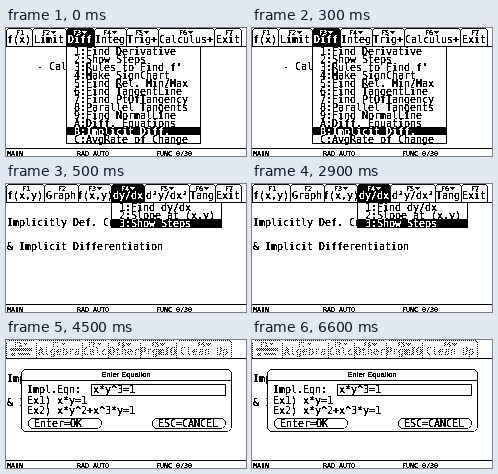
Recreate the animation shown at these times as an HTML page with a canvas. Size 240 by 128 pixels, loop 8 s.

```html
<!DOCTYPE html>
<html lang="en">
<head>
<meta charset="utf-8">
<title>Calculator menus</title>
<style>
  html, body { margin: 0; width: 100%; height: 100%; overflow: hidden; background: #fff; }
  canvas { display: block; width: 100vw; height: 100vh; image-rendering: pixelated; }
</style>
</head>
<body>
<canvas id="screen" width="240" height="128"></canvas>
<script>
const ctx = document.getElementById('screen').getContext('2d', { willReadFrequently: true });
const LOOP = 8000;
const BLACK = '#000', WHITE = '#fff';
const MONO = '"DejaVu Sans Mono", monospace';

function rect(x, y, w, h, color = BLACK) {
  ctx.fillStyle = color;
  ctx.fillRect(x, y, w, h);
}

function box(x, y, w, h, radius = 0) {
  ctx.fillStyle = WHITE;
  ctx.strokeStyle = BLACK;
  ctx.beginPath();
  ctx.roundRect(x + 0.5, y + 0.5, w - 1, h - 1, radius);
  ctx.fill();
  ctx.stroke();
}

// Painting twice keeps thin strokes dark enough to survive the threshold.
function glyphs(str, x, y) {
  ctx.fillText(str, x, y);
  ctx.fillText(str, x, y);
}

// One character per cell of the pixel grid; y is the baseline.
function gridText(str, x, y, color, font, cell) {
  ctx.font = font;
  ctx.fillStyle = color;
  [...str].forEach((ch, i) => glyphs(ch, x + cell * i, y));
}

const text = (str, x, y, color = BLACK) => gridText(str, x, y, color, '10px ' + MONO, 6);
const small = (str, x, y, color = BLACK) => gridText(str, x, y, color, '6.8px ' + MONO, 4);

// Tabs are [left edge, label, has arrow].
function toolbar(tabs, right, active = -1) {
  tabs.forEach(([x, label, arrow], i) => {
    const end = i + 1 < tabs.length ? tabs[i + 1][0] : right;
    const mid = Math.round((x + end) / 2);
    const ink = i === active ? WHITE : BLACK;
    rect(x + 2, 0, end - x - 3, 1);
    rect(x + 1, 1, 1, 1);
    rect(end - 1, 1, 1, 1);
    rect(x, 2, 1, 16);
    rect(end, 2, 1, 16);
    if (i === active) rect(x + 1, 1, end - x - 1, 17);
    small('F' + (i + 1), mid - (arrow ? 7 : 3), 7, ink);
    if (arrow) [5, 3, 1].forEach((w, row) => rect(mid + 2 + row, 3 + row, w, 1, ink));
    text(label, mid - label.length * 3, 15, ink);
  });
  rect(0, 18, 240, 1);
}

function menu(x, w, items, selected) {
  box(x, 18, w, items.length * 8 + 2);
  items.forEach((item, i) => {
    const on = i === selected;
    const key = (i + 1).toString(16).toUpperCase();
    if (on) rect(x, 19 + 8 * i, w, 8);
    text(key + ':' + item, x + 8, 27 + 8 * i, on ? WHITE : BLACK);
  });
}

function statusBar() {
  rect(0, 120, 240, 1);
  small('MAIN', 1, 128);
  small('RAD AUTO', 71, 128);
  small('FUNC 0/30', 150, 128);
}

function differentiationMenu() {
  text('- Cal', 31, 42);
  toolbar([[0, 'f(x)'], [26, 'Limit', 1], [60, 'Diff', 1], [88, 'Integ', 1],
    [120, 'Trig+', 1], [152, 'Calculus+', 1], [208, 'Exit']], 235, 2);
  menu(60, 135, ['Find Derivative', 'Show Steps', "Rules to Find f'", 'Make SignChart',
    'Find Rel. Min/Max', 'Find TangentLine', 'Find PtOfTangency', 'Parallel Tangents',
    'Find NormalLine', 'Diff. Equations', 'Implicit Diff.', 'AvgRate of Change'], 10);
}

function implicitText() {
  text('Implicitly Def. Cu', 1, 42);
  text('& Implicit Differentiation', 1, 66);
}

function implicitMenu() {
  implicitText();
  toolbar([[0, 'f(x,y)'], [38, 'Graph'], [72, 'f(x,y)', 1], [105, 'dy/dx', 1],
    [138, 'd²y/dx²', 1], [183, 'Tang', 1], [209, 'Exit']], 235, 3);
  menu(105, 111, ['Find dy/dx', 'Slope at (x,y)', 'Show Steps'], 2);
}

function equationDialog() {
  implicitText();
  toolbar([[0, '', 1], [30, 'Algebra', 1], [76, 'Calc', 1], [102, 'Other', 1],
    [134, 'PrgmIO', 1], [170, 'Clean Up', 1]], 225);
  rect(4, 8, 22, 3);
  rect(5, 13, 4, 3);
  rect(12, 13, 12, 2);
  // Grey out the inactive toolbar.
  for (let y = 0; y < 18; y++)
    for (let x = y % 2; x < 240; x += 2) rect(x, y, 1, 1, WHITE);

  box(15, 29, 211, 63, 5);
  ctx.font = '7.4px "Liberation Sans", sans-serif';
  ctx.fillStyle = BLACK;
  ctx.textAlign = 'center';
  glyphs('Enter Equation', 120, 37);
  ctx.textAlign = 'left';
  rect(15, 40, 211, 1);
  text('Impl.Eqn:', 21, 53);
  box(85, 44, 135, 12);
  text('x*y^3=1', 87, 53);
  text('Ex1) x*y=1', 21, 64);
  text('Ex2) x*y^2+x^3*y=1', 21, 74);
  box(22, 78, 74, 11, 5);
  text('Enter=OK', 28, 87);
  box(146, 78, 74, 11, 5);
  text('ESC=CANCEL', 152, 87);
}

// The display has only black and white pixels.
function threshold() {
  const image = ctx.getImageData(0, 0, 240, 128);
  const data = image.data;
  for (let i = 0; i < data.length; i += 4)
    data[i] = data[i + 1] = data[i + 2] = data[i] > 127 ? 255 : 0;
  ctx.putImageData(image, 0, 0);
}

let shown;
function frame() {
  const t = performance.now() % LOOP;
  const scene = t < 500 ? differentiationMenu : t < 4500 ? implicitMenu : equationDialog;
  if (scene !== shown) {
    rect(0, 0, 240, 128, WHITE);
    scene();
    statusBar();
    threshold();
    shown = scene;
  }
  requestAnimationFrame(frame);
}
frame();
</script>
</body>
</html>
```
